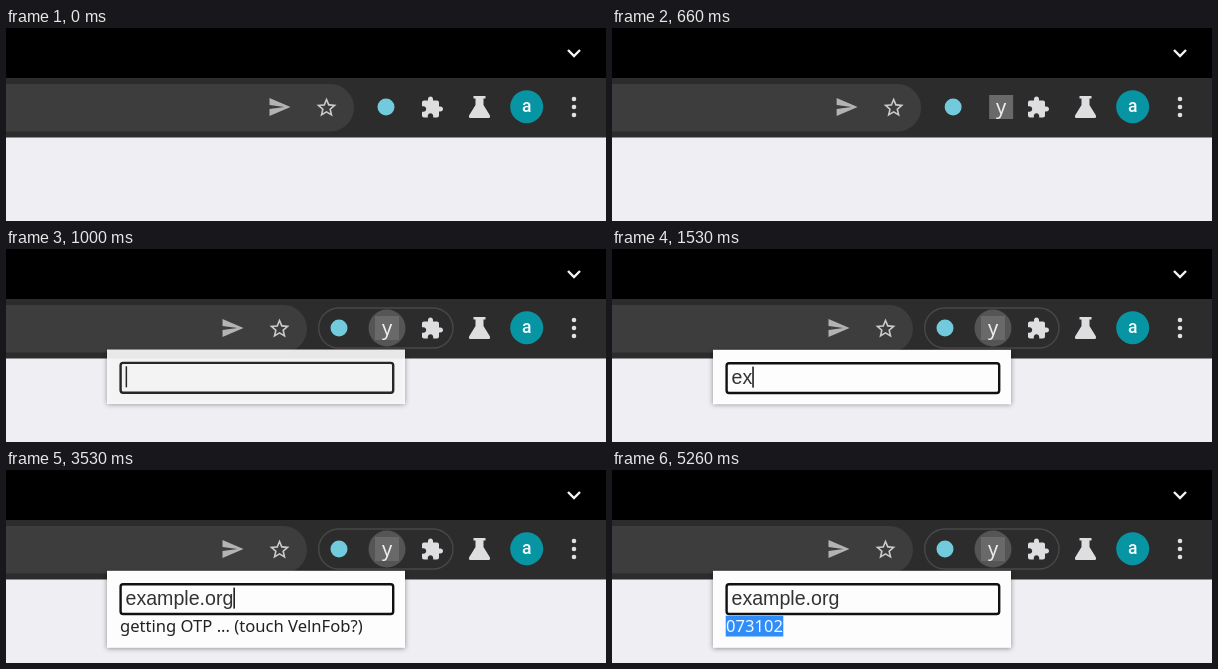
An HTML page with a canvas for the animation above (8000 ms loop, 600 by 193 pixels).

```html
<!DOCTYPE html>
<html lang="en">
<head>
<meta charset="utf-8">
<title>Browser toolbar popup</title>
<style>
html, body { margin: 0; width: 100%; height: 100%; overflow: hidden; background: #000; }
canvas { display: block; width: 600px; height: 193px; }
</style>
</head>
<body>
<canvas id="stage" width="600" height="193"></canvas>
<script>
const ctx = document.getElementById('stage').getContext('2d');
const LOOP = 8000;
const SANS = '"Noto Sans", sans-serif';
const INPUT_FONT = '19.6px "Liberation Sans", Arial, sans-serif';
const WORD = 'example.org';
const KEYS = [1300, 1530, 1700, 1800, 1900, 2100, 2200, 2400, 2600, 2760, 2960];

const ICONS = {
  send: new Path2D('M2 21L23 12 2 3v7l15 2-15 2z'),
  star: new Path2D('M22 9.24l-7.19-.62L12 2 9.19 8.63 2 9.24l5.46 4.73L5.82 21 12 17.27 18.18 21l-1.63-7.03L22 9.24zM12 15.4l-3.76 2.27 1-4.28-3.32-2.88 4.38-.38L12 6.1l1.71 4.04 4.38.38-3.32 2.88 1 4.28L12 15.4z'),
  puzzle: new Path2D('M20.5 11H19V7c0-1.1-.9-2-2-2h-4V3.5C13 2.12 11.88 1 10.5 1S8 2.12 8 3.5V5H4c-1.1 0-2 .9-2 2v3.8h1.5c1.49 0 2.7 1.21 2.7 2.7s-1.21 2.7-2.7 2.7H2V20c0 1.1.9 2 2 2h3.8v-1.5c0-1.49 1.21-2.7 2.7-2.7s2.7 1.21 2.7 2.7V22H17c1.1 0 2-.9 2-2v-4h1.5c1.38 0 2.5-1.12 2.5-2.5S21.88 11 20.5 11z'),
  flask: new Path2D('M6 1H18V3.5H16V10L22.3 20.2Q23.4 23 20.6 23H3.4Q.6 23 1.7 20.2L8 10V3.5H6z')
};

const ramp = (t, from, to) => Math.min(1, Math.max(0, (t - from) / (to - from)));
const easeOut = p => 1 - (1 - p) * (1 - p);

function box(x, y, w, h, color) {
  ctx.fillStyle = color;
  ctx.fillRect(x, y, w, h);
}

function disc(x, y, r, color) {
  ctx.fillStyle = color;
  ctx.beginPath();
  ctx.arc(x, y, r, 0, Math.PI * 2);
  ctx.fill();
}

function roundBox(x, y, w, h, r) {
  ctx.beginPath();
  ctx.roundRect(x, y, w, h, r);
}

function text(str, x, y, font, color, align = 'left') {
  ctx.font = font;
  ctx.fillStyle = color;
  ctx.textAlign = align;
  ctx.fillText(str, x, y);
}

function icon(name, x, y, color) {
  ctx.save();
  ctx.translate(x, y);
  ctx.fillStyle = color;
  ctx.fill(ICONS[name]);
  ctx.restore();
}

function faded(alpha, draw) {
  if (alpha <= 0) return;
  ctx.save();
  ctx.globalAlpha = alpha;
  draw();
  ctx.restore();
}

function drawToolbar(t) {
  const slide = t < 500 ? 0 : easeOut(ramp(t, 480, 790));
  const dx = -47 * slide;

  box(0, 0, 600, 50, '#000');
  box(0, 50, 600, 60, '#2d2c2d');
  box(0, 109.5, 600, 84, '#efeef3');

  ctx.strokeStyle = '#f4f4f4';
  ctx.lineWidth = 2.4;
  ctx.beginPath();
  ctx.moveTo(562, 22);
  ctx.lineTo(568, 28);
  ctx.lineTo(574, 22);
  ctx.stroke();

  // address field
  ctx.fillStyle = '#3e3d3e';
  roundBox(-40, 56, 388 + dx, 47.5, 23.7);
  ctx.fill();
  icon('send', 261.5 + dx, 67, '#b4b3b4');
  icon('star', 308.5 + dx, 67.5, '#cccbcc');

  // extensions
  faded(ramp(t, 760, 850), () => {
    ctx.strokeStyle = '#494849';
    ctx.lineWidth = 1.4;
    roundBox(312.7, 59, 134.3, 40, 20);
    ctx.stroke();
  });
  disc(380 + dx, 79, 8.5, '#72cbdc');
  faded(ramp(t, 880, 990), () => disc(381, 79, 18.5, '#565556'));
  faded(Math.min(1, slide * 1.25), () => {
    const x = 428 + dx;
    box(x - 12, 67, 24, 24, '#6a696a');
    text('y', x, 86, '20px ' + SANS, '#eee', 'center');
  });
  icon('puzzle', 414, 67.5, '#dedddf');

  icon('flask', 461.5, 67, '#dedddf');
  disc(520.7, 78.7, 16.5, '#0795a4');
  text('a', 520.7, 84.3, '500 17.5px Roboto, sans-serif', '#f2fafa', 'center');
  for (const y of [71, 79, 87]) disc(568, y, 2.3, '#e2e1e2');
}

function caretOn(t) {
  return t < 3560 || (t >= 4160 && t < 4760);
}

function drawPopup(t) {
  const show = ramp(t, 815, 1020);
  if (!show) return;
  const h = t < 3530 ? 54.5 : 77;

  ctx.save();
  ctx.globalAlpha = show;
  ctx.translate(0, -3 * (1 - show));

  ctx.save();
  ctx.shadowColor = 'rgba(0,0,0,.42)';
  ctx.shadowBlur = 5;
  ctx.shadowOffsetY = 1;
  box(101, 100.8, 298, h, '#fefdfe');
  ctx.restore();

  ctx.strokeStyle = '#111';
  ctx.lineWidth = 2.4;
  roundBox(114.6, 114.2, 272.6, 29.8, 2.5);
  ctx.stroke();

  const typed = WORD.slice(0, KEYS.filter(k => t >= k).length);
  text(typed, 119.5, 135, INPUT_FONT, '#333');
  if (caretOn(t)) {
    box(119.6 + ctx.measureText(typed).width, 117.6, 1.5, 21, '#111');
  }

  if (t >= 5260) {
    box(113.7, 145.7, 57.6, 20.8, '#2f8cfb');
    text('073102', 114, 161.8, '16.6px ' + SANS, '#f5f9ff');
  } else if (t >= 3530) {
    text('getting OTP ... (touch VelnFob?)', 114, 161.8, '16.6px ' + SANS, '#222');
  }
  ctx.restore();
}

function frame() {
  const t = performance.now() % LOOP;
  drawToolbar(t);
  drawPopup(t);
  requestAnimationFrame(frame);
}
frame();
</script>
</body>
</html>
```
